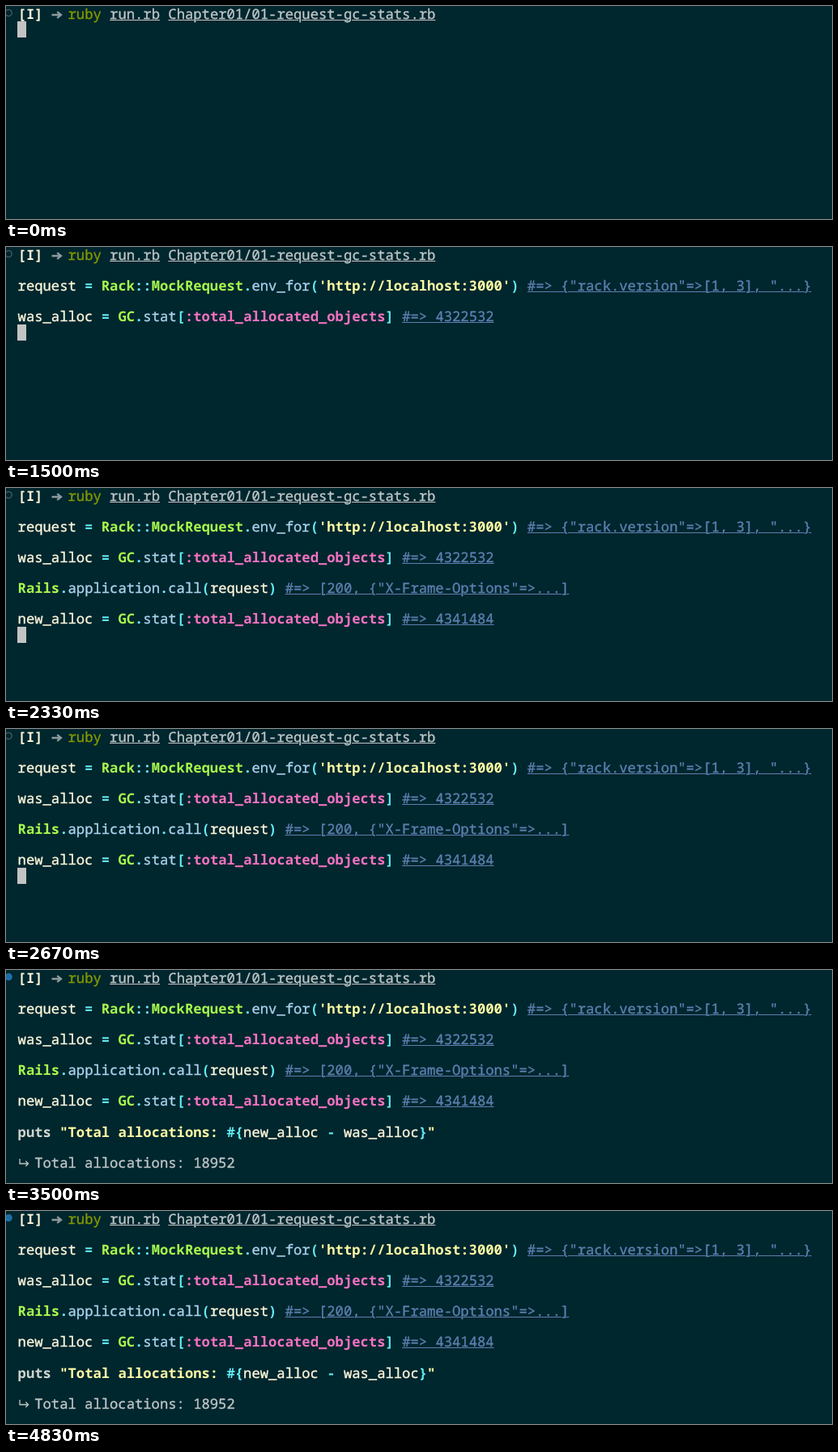
These frames come from a looping animation (1020 px wide and 264 px high, 4.99 s). An HTML page:

```html
<!DOCTYPE html>
<html lang="en">
<head>
<meta charset="utf-8">
<title>Terminal: request GC stats</title>
<style>
  :root { --row: 19.05px; --loop: 4990ms; }
  html, body { margin: 0; width: 100%; height: 100%; overflow: hidden; background: #00262e; }
  .term {
    position: relative; width: 1020px; height: 264px; overflow: hidden;
    font: 500 17.2px/var(--row) "Noto Sans Mono", "DejaVu Sans Mono", monospace;
    font-variant-ligatures: none; text-rendering: geometricPrecision;
    -webkit-text-stroke: .35px; white-space: pre; color: #fdf8dc;
  }
  .line { position: absolute; left: 14.6px; top: calc(var(--r) * var(--row) + 1px); }
  svg { position: absolute; left: 0; top: 0; }
  b { font-weight: 700; -webkit-text-stroke: 0; }
  u { text-decoration: underline 1px; text-underline-offset: 1px; }
  .out, .line u { color: #bfc7c8; }
  .line .note { color: #5c80b0; }
  .cmd { color: #829a00; }
  .const { color: #a6f94c; }
  .op { color: #62eef5; }
  .fn { color: #a9d4ee; }
  .str { color: #fdfba3; }
  .sym { color: #f672c2; }
  .puts { color: #ced5cf; }

  .cursor {
    position: absolute; left: 14.3px; top: 0; width: 10.6px; height: 19.4px;
    margin-top: .4px; background: #c2c4c4;
    animation: cursor var(--loop) step-end infinite;
  }
  .a { animation: a var(--loop) step-end infinite; }
  .b { animation: b var(--loop) step-end infinite; }
  .c { animation: c var(--loop) step-end infinite; }
  .d { animation: d var(--loop) step-end infinite; }
  .e { animation: e var(--loop) step-end infinite; }
  .dot { fill: #00262e; stroke: #52666a; animation: dot var(--loop) step-end infinite; }

  /* one statement every 500 ms, starting at 830 ms */
  @keyframes a { 0% { visibility: hidden } 16.633%, 100% { visibility: visible } }
  @keyframes b { 0% { visibility: hidden } 26.653%, 100% { visibility: visible } }
  @keyframes c { 0% { visibility: hidden } 36.673%, 100% { visibility: visible } }
  @keyframes d { 0% { visibility: hidden } 46.693%, 100% { visibility: visible } }
  @keyframes e { 0% { visibility: hidden } 56.713%, 100% { visibility: visible } }
  @keyframes cursor {
    0% { top: calc(1 * var(--row)); opacity: 1 }
    16.633% { top: calc(3 * var(--row)); opacity: 1 }
    26.653% { top: calc(5 * var(--row)); opacity: 1 }
    36.673% { top: calc(7 * var(--row)); opacity: 1 }
    46.693% { top: calc(9 * var(--row)); opacity: 1 }
    56.713% { top: calc(13 * var(--row)); opacity: 1 }
    63.527%, 100% { top: calc(13 * var(--row)); opacity: 0 }
  }
  @keyframes dot {
    0% { fill: #00262e; stroke: #52666a }
    60.12%, 100% { fill: #1d6fa8; stroke: #1d6fa8 }
  }
</style>
</head>
<body>
<div class="term">
  <svg width="1020" height="264" fill="none">
    <circle class="dot" cx="3.2" cy="8.5" r="4" stroke-width="1.2"/>
    <path d="M56.5 11H66M63.2 7.2L68 11L63.2 14.8" stroke="#8d9a9c" stroke-width="2.3"/>
    <path class="e" d="M17 234V240H27.5M24.3 236.8L27.5 240L24.3 243.2" stroke="#bfc7c8" stroke-width="1.3"/>
  </svg>
  <div class="line" style="--r:0"><b>[I]</b>   <span class="cmd">ruby</span> <u>run.rb</u> <u>Chapter01/01-request-gc-stats.rb</u></div>
  <div class="line a" style="--r:2">request <b class="op">=</b> <b class="const">Rack</b><b class="op">::</b><b class="const">MockRequest</b><b class="op">.</b><span class="fn">env_for</span><b class="op">(</b><b class="str">'http://localhost:3000'</b><b class="op">)</b> <u class="note">#=> {"rack.version"=>[1, 3], "...}</u></div>
  <div class="line b" style="--r:4">was_alloc <b class="op">=</b> <b class="const">GC</b><b class="op">.</b><span class="fn">stat</span><b class="op">[</b><b class="sym">:total_allocated_objects</b><b class="op">]</b> <u class="note">#=> 4322532</u></div>
  <div class="line c" style="--r:6"><b class="const">Rails</b><b class="op">.</b><span class="fn">application</span><b class="op">.</b><span class="fn">call</span><b class="op">(</b>request<b class="op">)</b> <u class="note">#=> [200, {"X-Frame-Options"=>...]</u></div>
  <div class="line d" style="--r:8">new_alloc <b class="op">=</b> <b class="const">GC</b><b class="op">.</b><span class="fn">stat</span><b class="op">[</b><b class="sym">:total_allocated_objects</b><b class="op">]</b> <u class="note">#=> 4341484</u></div>
  <div class="line e" style="--r:10"><b class="puts">puts</b> <b class="str">"Total allocations: </b><b class="op">#{</b>new_alloc <b class="op">-</b> was_alloc<b class="op">}</b><b class="str">"</b></div>
  <div class="line out e" style="--r:12">  Total allocations: 18952</div>
  <div class="cursor"></div>
</div>
</body>
</html>
```
